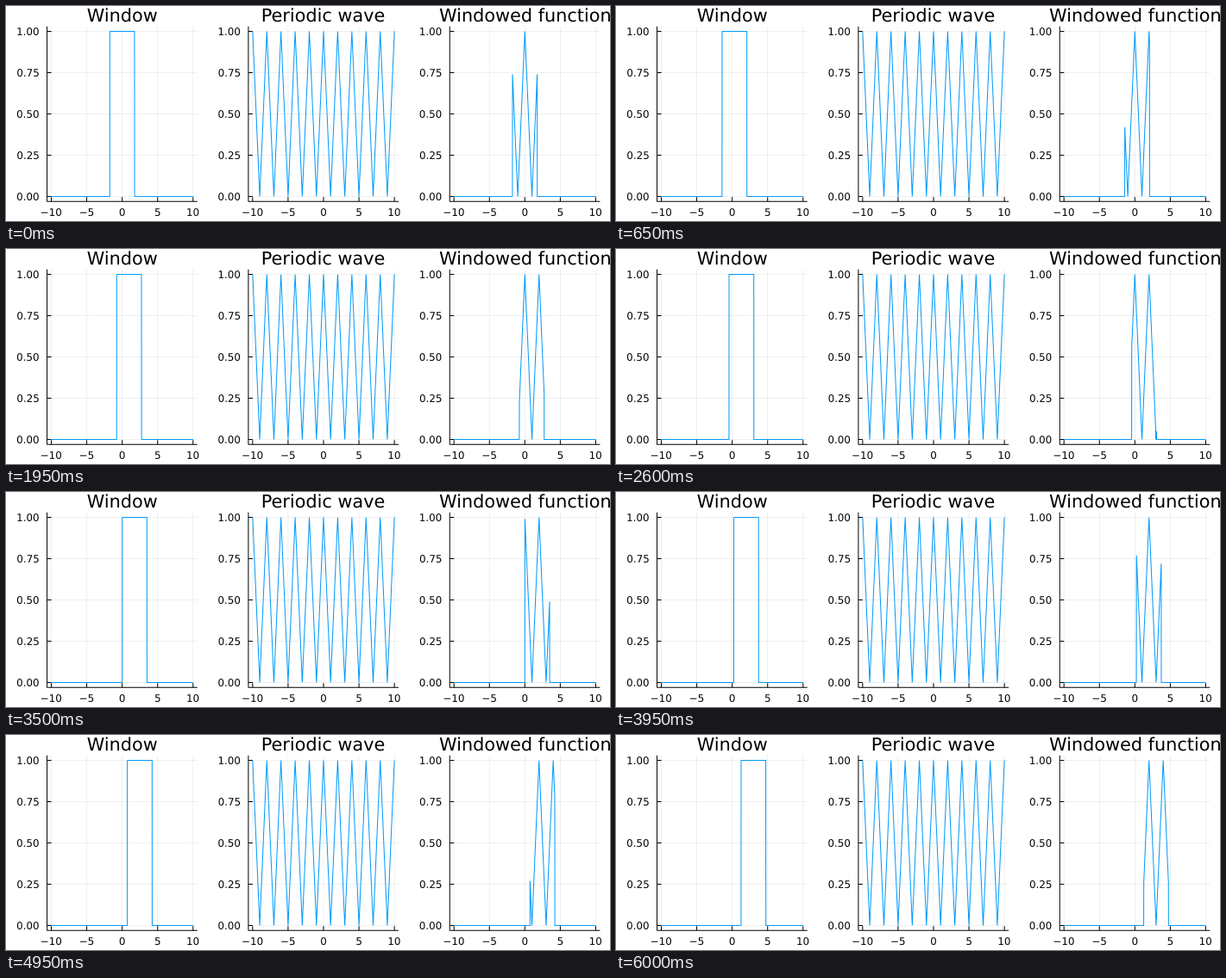
Write a matplotlib script that moves like this. It is 700x250 px and loops after 6050 ms.

```python
import numpy as np
import matplotlib.pyplot as plt
from matplotlib.animation import FuncAnimation
from matplotlib.patches import PathPatch
from matplotlib.textpath import TextPath
from matplotlib.transforms import Affine2D

W, H, DPI = 700, 250, 100
PX = 72 / DPI                      # one pixel in points
FRAMES, INTERVAL = 121, 50
SHIFT = 1 / 40                     # window travel per frame
HALF_WIDTH = 1.75
BLUE = "#009afa"

X_UNIT, Y_UNIT = 8.215, 192        # pixels per data unit
X_ZERO, Y_ZERO = 134.65, 221.5     # pixel position of the first panel's zero
X_LIM, Y_LIM = 10.6, (-0.03, 1.03)
PANEL_STEP = W / 3
TITLE_SIZE = 20.8
TICK_SIZE = TITLE_SIZE * 8 / 14
TICK = 5

plt.rcParams.update({
    "font.family": "DejaVu Sans",
    "path.simplify": False,
    "lines.solid_capstyle": "butt",
    "lines.solid_joinstyle": "miter",
})

x = np.arange(-1000, 1001) / 100


def window(t):
    return (np.abs(t) < HALF_WIDTH).astype(float)


def triangle(t):
    return 1 - np.abs((t + 1) % 2 - 1)


def corners(y):
    """Drop samples that lie on a straight run."""
    keep = np.ones(len(y), bool)
    keep[1:-1] = np.abs(np.diff(y, 2)) > 1e-9
    return x[keep], y[keep]


def to_y(v):
    return Y_ZERO - v * Y_UNIT


def stroke(ax, xs, ys, color="black", width=1, **style):
    return ax.plot(xs, ys, color=color, linewidth=width * PX, snap=False,
                   **style)[0]


def write(ax, text, px, baseline, size, align):
    """Set text at a sub-pixel position; align 0.5 centres, 1 ends at px."""
    path = TextPath((0, 0), text, size=size)
    box = path.get_extents()
    start = px - box.x0 - align * box.width
    flip = Affine2D().scale(1, -1).translate(start, baseline)
    ax.add_patch(PathPatch(path.transformed(flip), facecolor="black",
                           linewidth=0, snap=False))


class Panel:
    def __init__(self, ax, column, title):
        self.zero = X_ZERO + column * PANEL_STEP
        left, right = self.to_x(-X_LIM), self.to_x(X_LIM)
        bottom, top = to_y(Y_LIM[0]), to_y(Y_LIM[1])
        grid = dict(width=0.6, alpha=0.1)

        write(ax, title, self.zero, 18.1, TITLE_SIZE, 0.5)
        for v in range(-10, 11, 5):
            px = self.to_x(v)
            stroke(ax, [px, px], [bottom, top], **grid)
            stroke(ax, [px, px], [bottom, bottom - TICK])
            write(ax, str(v).replace("-", "\u2212"), px, 244, TICK_SIZE, 0.5)
        for v in np.linspace(0, 1, 5):
            py = to_y(v)
            stroke(ax, [left, right], [py, py], **grid)
            stroke(ax, [left, left + TICK], [py, py])
            write(ax, f"{v:.2f}", left - 9.8, py + 4.4, TICK_SIZE, 1)
        stroke(ax, [left, left, right], [top, bottom, bottom])
        self.line = stroke(ax, [], [], color=BLUE)

    def to_x(self, v):
        return self.zero + v * X_UNIT

    def show(self, y):
        xs, ys = corners(y)
        self.line.set_data(self.to_x(xs), to_y(ys))


fig = plt.figure(figsize=(W / DPI, H / DPI), dpi=DPI, facecolor="white")
stage = fig.add_axes([0, 0, 1, 1], xlim=(0, W), ylim=(H, 0))
stage.axis("off")
titles = ("Window", "Periodic wave", "Windowed function")
box, wave, product = [Panel(stage, i, t) for i, t in enumerate(titles)]
wave.show(triangle(x))


def update(i):
    mask = window(x - i * SHIFT)
    box.show(mask)
    product.show(mask * triangle(x))
    return box.line, product.line


anim = FuncAnimation(fig, update, frames=FRAMES, interval=INTERVAL,
                     repeat=True, repeat_delay=0)
plt.show()
```
